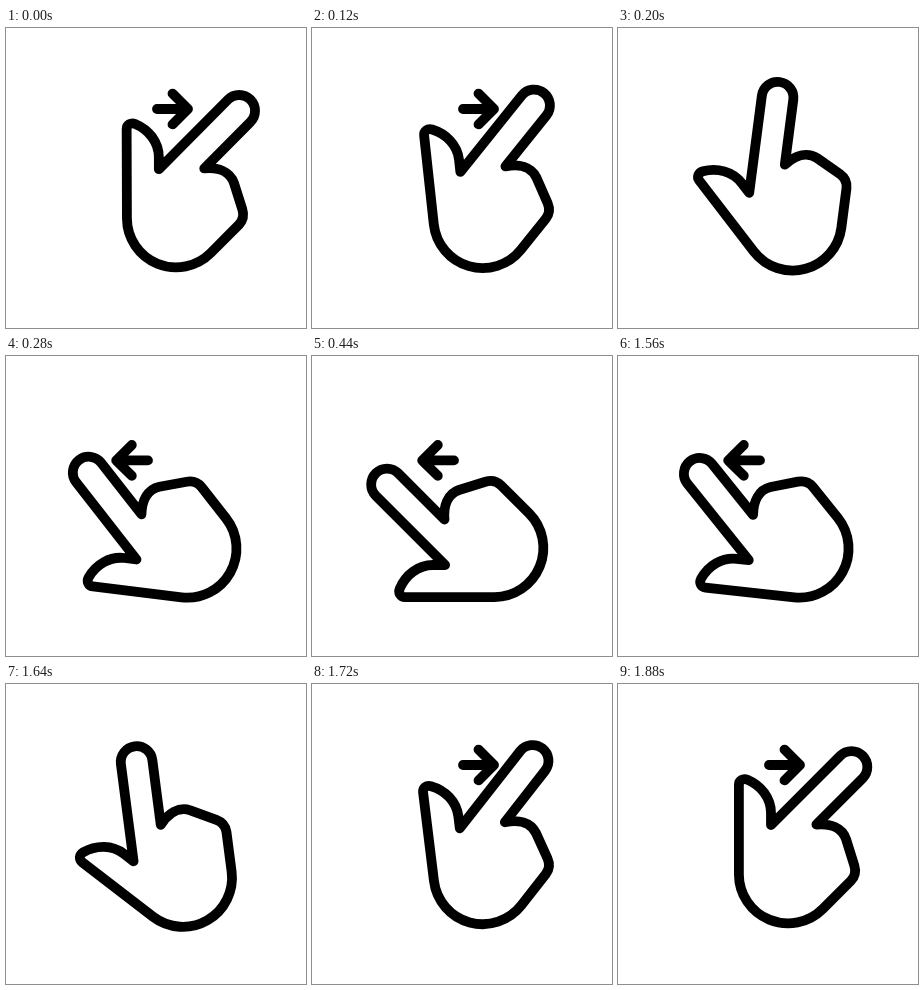
An HTML page for the animation above (2.88 s loop, 300 by 300 pixels).

```html
<!DOCTYPE html>
<html lang="en">
<head>
<meta charset="utf-8">
<title>Swipe gesture</title>
<style>
  html, body { margin: 0; width: 100%; height: 100%; overflow: hidden; background: #fff; }
  svg { display: block; width: 100%; height: 100%; }
  path { fill: none; stroke: #000; stroke-width: 9.8; stroke-linecap: round; stroke-linejoin: round; }
</style>
</head>
<body>
<svg viewBox="0 0 300 300">
  <path id="right" d="M151 81H182M166.5 65.6L182 81L166.5 96.4"/>
  <path id="left" d="M142 104.4H110.2M125.8 89L110.2 104.4L125.8 119.8"/>
  <path id="hand" d="M153 141.1L222.3 71.8A15.8 15.8 0 0 1 244.7 94.2L198.4 140.5
    C212 139.3 224 143.5 228 155L236.3 181.5C238 187 236.7 192.9 232.8 196.9L204.7 225
    A49.1 49.1 0 0 1 120.9 190.4V101C120.9 96.5 125 94 129.5 95.8C143 101.5 153 114 153 129Z"/>
</svg>
<script>
  const LOOP = 2880, HALF = 1440, STEP = 40, LAST = 11;
  const [hand, left, right] = ['hand', 'left', 'right'].map(id => document.getElementById(id));

  // Cubic bezier ease (a, 0, 1 - a, 1), solved by bisection.
  function ease(x, a = 0.926) {
    let lo = 0, hi = 1, s;
    for (let i = 0; i < 30; i++) {
      s = (lo + hi) / 2;
      const r = 1 - s;
      if (3 * a * s * r * r + 3 * (1 - a) * s * s * r + s ** 3 < x) lo = s;
      else hi = s;
    }
    return s * s * (3 - 2 * s);
  }

  const show = (el, on) => el.setAttribute('visibility', on ? 'visible' : 'hidden');

  function draw(now) {
    const t = now % LOOP;
    const back = t >= HALF;
    const step = Math.min(LAST, Math.floor((t % HALF) / STEP));
    const turn = ease(0.0849 * (step + 0.81));

    hand.setAttribute('transform', `rotate(${-90 * (back ? 1 - turn : turn)} 177 185)`);
    // The old arrow goes early in the turn, the new one arrives late.
    const early = step < 4, late = step > 6;
    show(right, back ? late : early);
    show(left, back ? early : late);
  }

  let start;
  function tick(now) {
    start ??= now;
    draw(now - start);
    requestAnimationFrame(tick);
  }
  draw(0);
  requestAnimationFrame(tick);
</script>
</body>
</html>
```
